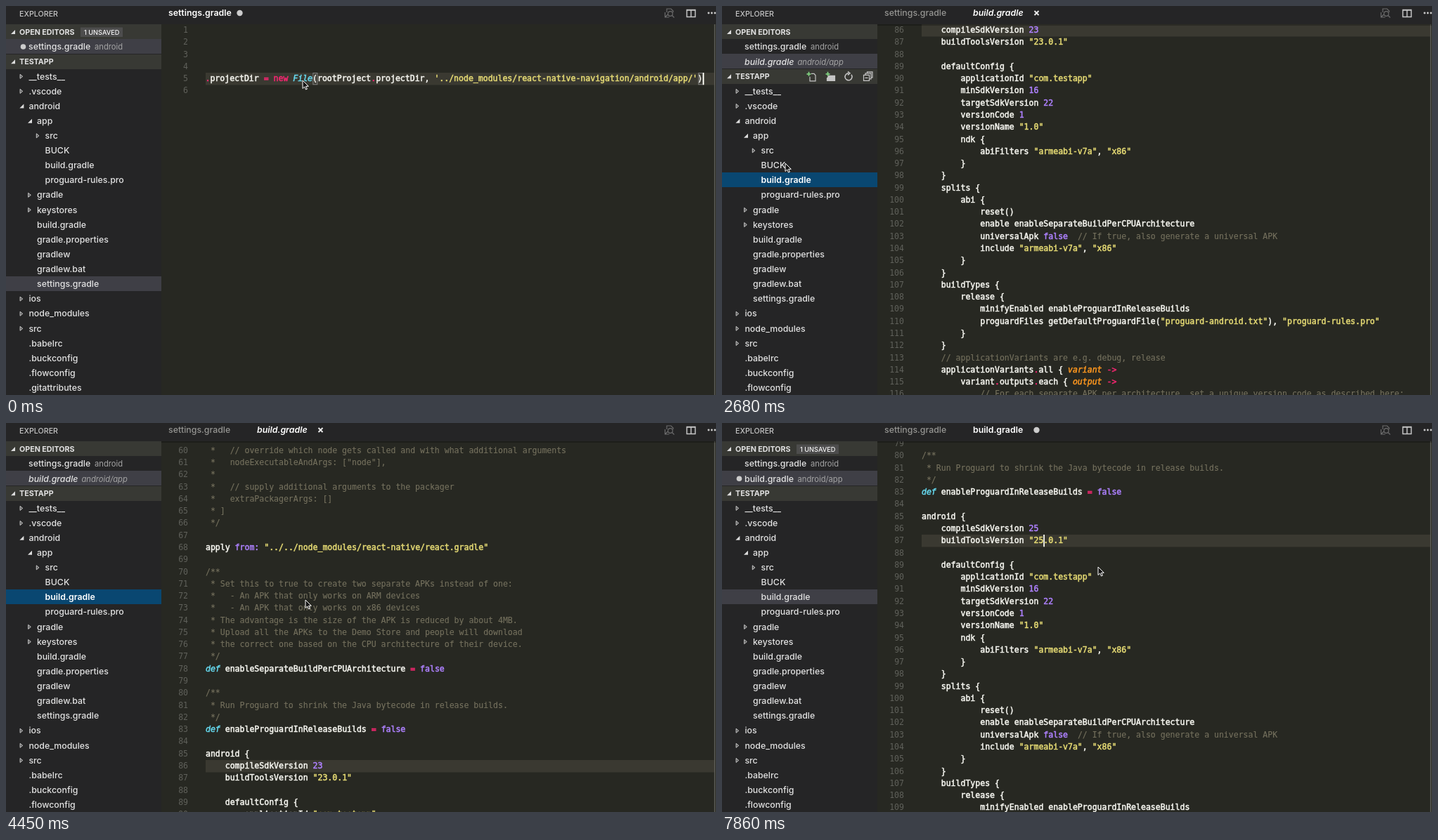
These frames come from a looping animation (1010x554 px, 8000 ms). An HTML page:

```html
<!DOCTYPE html>
<html lang="en">
<head>
<meta charset="utf-8">
<title>Editor</title>
<style>
  html, body { margin: 0; width: 100%; height: 100%; overflow: hidden; background: #272822; }
  #stage { display: block; width: 1010px; height: 554px; }
  text { white-space: pre; }
  .ui { font: 500 12.35px Inter, sans-serif; fill: #e2e2e2; }
  .head { font-size: 10.7px; font-weight: 700; }
  .title { font-size: 10.7px; fill: #c4c4c4; }
  .path { font-size: 11.2px; font-weight: 400; fill: #a4a4a4; }
  .badge { font-size: 9.2px; fill: #f4f4f4; }
  .active { fill: #fff; font-weight: 600; }
  .idle { fill: #959592; }
  .it { font-style: italic; }
  .code, .num { font: 11.53px "DejaVu Sans Mono", monospace; }
  .num { fill: #5f605a; text-anchor: end; }
  .code { color: #f8f8f2; fill: currentColor; stroke: currentColor; stroke-width: .5; }
  .comment { color: #75715e; stroke-width: .12; }
  .string { color: #e6db74; }
  .type { color: #66d9ef; font-style: italic; }
  .value { color: #ae81ff; }
  .op { color: #f92672; }
  .param { color: #fd971f; font-style: italic; }
  .icon { fill: none; stroke: #c5c5c5; stroke-width: 1.2; }
  .plus { stroke: #7fcf7f; stroke-width: 1.8; }
  .dim { stroke: #6c6c6c; }
  .bold { stroke-width: 1.5; }
  .solid { fill: #c5c5c5; }
  .cross { stroke: #eee; stroke-width: 1.8; }
</style>
</head>
<body>
<svg id="stage" viewBox="0 0 1010 554"></svg>
<script>
const LOOP = 8000, LINE = 17.28, CHAR = 6.94, CODE_X = 284, TOP = 26, ROW = 21.12;
const stage = document.getElementById('stage');

const settingsCode = `rootProject.name = 'testapp'

include ':app'
include ':react-native-navigation'
project(':react-native-navigation').projectDir = new File(rootProject.projectDir, '../node_modules/react-native-navigation/android/app/')
`.split('\n');

const buildStart = 57;
const buildCode = ` *   // for example, you might want to remove it from here.
 *   inputExcludes: ["android/**", "ios/**"],
 *
 *   // override which node gets called and with what additional arguments
 *   nodeExecutableAndArgs: ["node"],
 *
 *   // supply additional arguments to the packager
 *   extraPackagerArgs: []
 * ]
 */

apply from: "../../node_modules/react-native/react.gradle"

/**
 * Set this to true to create two separate APKs instead of one:
 *   - An APK that only works on ARM devices
 *   - An APK that only works on x86 devices
 * The advantage is the size of the APK is reduced by about 4MB.
 * Upload all the APKs to the Demo Store and people will download
 * the correct one based on the CPU architecture of their device.
 */
def enableSeparateBuildPerCPUArchitecture = false

/**
 * Run Proguard to shrink the Java bytecode in release builds.
 */
def enableProguardInReleaseBuilds = false

android {
    compileSdkVersion {sdk}
    buildToolsVersion "{tools}.0.1"

    defaultConfig {
        applicationId "com.testapp"
        minSdkVersion 16
        targetSdkVersion 22
        versionCode 1
        versionName "1.0"
        ndk {
            abiFilters "armeabi-v7a", "x86"
        }
    }
    splits {
        abi {
            reset()
            enable enableSeparateBuildPerCPUArchitecture
            universalApk false  // If true, also generate a universal APK
            include "armeabi-v7a", "x86"
        }
    }
    buildTypes {
        release {
            minifyEnabled enableProguardInReleaseBuilds
            proguardFiles getDefaultProguardFile("proguard-android.txt"), "proguard-rules.pro"
        }
    }
    // applicationVariants are e.g. debug, release
    applicationVariants.all { variant ->
        variant.outputs.each { output ->
            // For each separate APK per architecture, set a unique version code as described here:`.split('\n');

// depth, kind (> closed folder, v open folder, - file), label
const tree = `0>__tests__ 0>.vscode 0vandroid 1vapp 2>src 2-BUCK 2-build.gradle 2-proguard-rules.pro
1>gradle 1>keystores 1-build.gradle 1-gradle.properties 1-gradlew 1-gradlew.bat 1-settings.gradle
0>ios 0>node_modules 0>src 0-.babelrc 0-.buckconfig 0-.flowconfig 0-.gitattributes`.split(/\s+/);

// Each step changes part of the state. `top` is the y of line 1, or of line 86 in build.gradle.
const steps = [
  [0, { build: false, dirty: true, hover: false, focus: false, dx: -243.2, top: 26, line: 5, caret: 137, mouse: [422, 106], sdk: '23', tools: '23' }],
  [150, { dx: -190, top: 25 }],
  [300, { dx: -60 }],
  [450, { dx: 0 }],
  [750, { mouse: [334, 95] }],
  [1350, { dirty: false }],
  [1500, { mouse: [290, 150] }],
  [1640, { mouse: [190, 225], hover: true }],
  [1790, { mouse: [110, 255] }],
  [1940, { mouse: [96, 259] }],
  [2090, { mouse: [93, 248] }],
  [2240, { mouse: [91, 233] }],
  [2380, { mouse: [90, 224] }],
  [2530, { build: true, focus: true, top: 26, line: 86, caret: null }],
  [2830, { mouse: [150, 232] }],
  [2980, { mouse: [260, 243], hover: false }],
  [3120, { mouse: [370, 250] }],
  [3270, { mouse: [418, 252] }],
  [3420, { mouse: [426, 252] }],
  [3870, { top: 170 }],
  [4020, { top: 420 }],
  [4160, { top: 528 }],
  [4310, { top: 480 }],
  [4460, { top: 310 }],
  [4600, { top: 190 }],
  [4750, { top: 143, mouse: [428, 248] }],
  [5050, { mouse: [440, 215] }],
  [5200, { mouse: [458, 165] }],
  [5350, { mouse: [464, 143] }],
  [5500, { focus: false, caret: 24 }],
  [5800, { mouse: [490, 155] }],
  [5940, { mouse: [510, 165] }],
  [6390, { dirty: true, sdk: '2', caret: 23 }],
  [6540, { sdk: '25', caret: 24 }],
  [6830, { mouse: [460, 164] }],
  [6980, { line: 87, caret: 25 }],
  [7270, { top: 142, tools: '2', caret: 24 }],
  [7420, { tools: '25', caret: 25 }],
  [7560, { mouse: [480, 178] }],
  [7710, { mouse: [520, 198] }],
  [7860, { mouse: [535, 205] }],
];
const states = [];
steps.forEach(([, change], i) => states.push({ ...states[i - 1], ...change }));

const rect = (x, y, w, h, fill, extra = '') =>
  `<rect x="${x}" y="${y}" width="${w}" height="${h}" fill="${fill}" ${extra}/>`;
const text = (x, y, cls, str) => `<text x="${x}" y="${y}" class="${cls}">${str}</text>`;
const ui = (x, mid, str, cls = '') => text(x, mid + 4.3, 'ui ' + cls, str);
const path = (d, cls = '', extra = '') => `<path d="${d}" class="${cls}" ${extra}/>`;
const icon = (d, cls = '') => path(d, 'icon ' + cls);
const dot = (x, y, r) => `<circle cx="${x}" cy="${y}" r="${r}" fill="#ccc"/>`;
const openMark = (x, y) => path(`M${x - 3} ${y + 3}h6v-6z`, '', 'fill="#ddd"');
const closedMark = (x, y) => path(`M${x - 1.8} ${y - 3}l3.6 3 -3.6 3z`, '', 'fill="#555" stroke="#ccc"');

const rules = [
  ['comment', '^\\s*\\/?\\*.*|\\/\\/.*'],
  ['string', '"[^"]*"|\'[^\']*\''],
  ['type', '\\b(?:def|File)\\b'],
  ['value', 'from:|\\bfalse\\b|\\b\\d+\\b'],
  ['op', '->|=|\\bnew\\b|\\.'],
  ['param', '\\b(?:variant|output)(?= ->)'],
];
const tokens = new RegExp(rules.map(([, re]) => `(${re})`).join('|'), 'g');
const escapeText = s => s.replace(/&/g, '&amp;').replace(/</g, '&lt;').replace(/>/g, '&gt;');

function highlight(line) {
  let out = '', last = 0;
  for (const m of line.matchAll(tokens)) {
    const kind = rules[m.slice(1).findIndex(Boolean)][0];
    out += escapeText(line.slice(last, m.index)) + `<tspan class="${kind}">${escapeText(m[0])}</tspan>`;
    last = m.index + m[0].length;
  }
  return out + escapeText(line.slice(last));
}

function sidebar(s) {
  const rows = s.build ? 2 : 1, header = 47.5 + rows * ROW, mid = header + ROW / 2;
  const chosen = s.build ? 6 : 14;
  const band = (y, fill) => rect(0, Math.floor(y), 221, 21, fill);
  let out = rect(0, 0, 221, 554, '#252526') + ui(19, 10.5, 'EXPLORER', 'title')
    + band(26, '#383934') + openMark(10, 37) + ui(19, 36.8, 'OPEN EDITORS', 'head')
    + band(header - ROW, '#3f3f46') + ui(32, 58, 'settings.gradle') + ui(126, 58, 'android', 'path')
    + band(header + .5, '#383934') + openMark(10, mid) + ui(19, mid - .2, 'TESTAPP', 'head');
  if (s.build) {
    const style = s.dirty ? '' : 'it';
    out += ui(32, 79.2, 'build.gradle', style) + ui(107.5, 79.2, 'android/app', 'path ' + style);
  }
  if (s.dirty) {
    out += rect(106, 30.5, 60, 13.5, '#4d4d4d') + ui(111, 36.6, '1 UNSAVED', 'badge') + dot(24.5, header - ROW / 2, 3.8);
  }
  if (s.hover) out += treeActions(mid);

  tree.forEach((item, i) => {
    const x = 32.4 + item[0] * 11.6, y = header + ROW * (i + 1.5);
    const lit = i === chosen && s.focus;
    if (i === chosen) out += band(y - ROW / 2, lit ? '#094771' : '#3f3f46');
    if (item[1] === '>') out += closedMark(x - 10.5, y);
    if (item[1] === 'v') out += openMark(x - 10, y);
    out += ui(x, y - .1, item.slice(2), lit ? 'active' : '');
  });
  return out;
}

function treeActions(y) {
  return `<g transform="translate(0 ${y})">`
    + icon('M127 -4h4l2 2.5v8h-8v-6') + icon('M120.5 -3.5h6m-3 -3v6', 'plus')
    + icon('M151 -1h9.5v7h-11v-4', 'solid') + icon('M147.5 -3.5h6m-3 -3v6', 'plus')
    + icon('M184 -2.5a5 5 0 1 1 -4 -2M179 -7l3 2.5 -3 2.5', 'bold')
    + icon('M201.5 -2h8v8h-8zM204 -2v-2.5h8v8h-2.5M206.5 -4.5v-2h7.5v8h-2M203.5 2h4') + '</g>';
}

function tabs(s) {
  const mark = s.build ? 447.5 : 332.5;
  return rect(221, 0, 789, TOP, '#252526')
    + ui(231, 10, 'settings.gradle', s.build ? 'idle' : 'active')
    + (s.build ? ui(357, 10, 'build.gradle', 'active ' + (s.dirty ? '' : 'it')) : '')
    + (s.dirty ? dot(mark, 10, 4.2) : icon(`M${mark - 3} 7l6 6m0 -6l-6 6`, 'cross'))
    + icon('M940 9v-5h6l3 3v2M937.5 9v7h6M937.5 16l4 -4M947.5 13.5l3 3', 'dim')
    + '<circle cx="945" cy="11" r="3.3" class="icon dim"/>'
    + icon('M968.5 5.5h12v10h-12zM974.5 5v10M968 6h13', 'bold')
    + [999.5, 1004, 1008.5].map(x => dot(x, 10, 1.4)).join('');
}

function editor(s) {
  const first = s.build ? buildStart : 1, anchor = s.build ? 86 : 1;
  const lineTop = n => s.top - TOP + (n - anchor) * LINE;
  let numbers = '', code = '';
  (s.build ? buildCode : settingsCode).forEach((raw, i) => {
    const y = lineTop(first + i);
    if (y < -LINE || y > 554) return;
    const line = raw.replace('{sdk}', s.sdk).replace('{tools}', s.tools);
    numbers += text(38, y + 12, 'num', first + i);
    code += text(s.dx, y + 12, 'code', highlight(line));
  });
  const y = Math.round(lineTop(s.line));
  let marks = '';
  if (!s.build) {
    for (const col of [57, 136]) {
      marks += rect(s.dx + col * CHAR + .5, y + .5, CHAR - 1, LINE - 1, 'none', 'stroke="#888" stroke-width=".9"');
    }
  }
  const caret = s.caret === null ? '' : rect(s.dx + s.caret * CHAR - .3, y, 1.8, LINE, '#f8f8f0');
  return `<svg x="221" y="${TOP}" width="63" height="528">${numbers}</svg>`
    + `<svg x="${CODE_X}" y="${TOP}" width="726" height="528">`
    + rect(0, y, 724, 17.5, '#3a3931') + marks + code + caret + '</svg>'
    + rect(1007.5, TOP, 1.5, 528, '#5c5d57')
    + (s.build ? rect(221, TOP, 789, 2, '#000', 'opacity=".25"') : '');
}

const pointer = ([x, y]) => path('M0 0v11.5l2.7 -2.5 1.8 4 1.9 -.8 -1.8 -3.9h3.7z', '',
  `transform="translate(${x} ${y})" fill="#151515" stroke="#fff" stroke-width="1"`);

let shown = -1;
const start = performance.now();
function draw() {
  const t = (performance.now() - start) % LOOP;
  const index = steps.findLastIndex(([at]) => at <= t);
  if (index !== shown) {
    const s = states[shown = index];
    stage.innerHTML = rect(0, 0, 1010, 554, '#272822') + editor(s) + tabs(s) + sidebar(s) + pointer(s.mouse);
  }
  requestAnimationFrame(draw);
}
draw();
</script>
</body>
</html>
```
